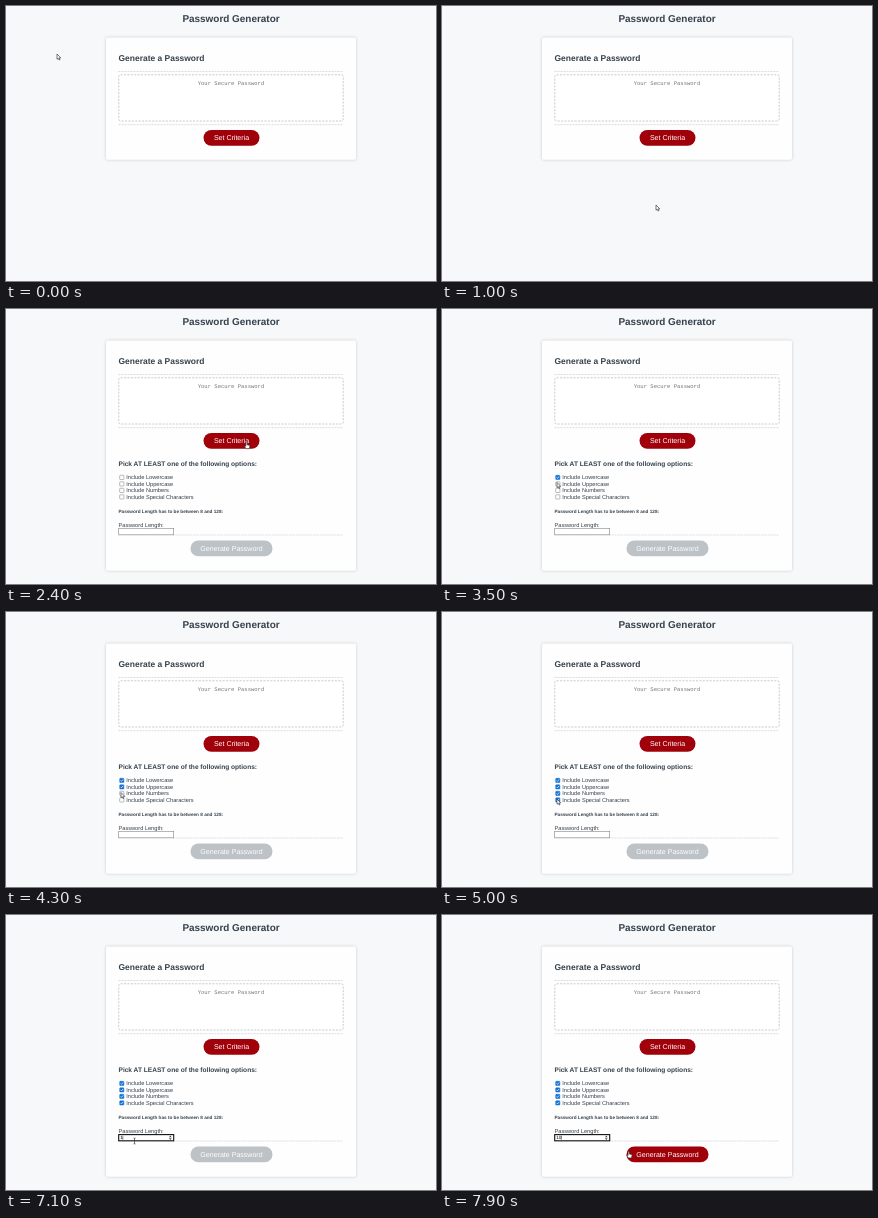
An HTML page that plays this animation: 430 px wide and 275 px high, repeating every 8 s.

```html
<!DOCTYPE html>
<html lang="en">
<head>
<meta charset="utf-8">
<title>Password Generator</title>
<style>
  html, body { margin: 0; width: 100%; height: 100%; overflow: hidden; background: #f6f8fa; }
  svg { display: block; width: 430px; height: 275px; }
  text { font-family: "Liberation Sans", Arial, sans-serif; font-size: 5.65px; fill: #35414c; text-rendering: geometricPrecision; }
  .bold { font-weight: bold; }
  .mid { text-anchor: middle; }
  .mono { font-family: "Liberation Mono", "Courier New", monospace; font-size: 5.55px; fill: #757575; }
  .btn { font-size: 7.06px; fill: #fff; }
  .rule { stroke: #cfd4d8; stroke-width: .8; stroke-dasharray: 2 1; }
  .card { filter: drop-shadow(0 .7px 1.4px rgba(0, 0, 0, .19)); }
  .pointer { fill: #fff; stroke: #333; stroke-width: .65; stroke-linejoin: round; }
</style>
</head>
<body>
<svg viewBox="0 0 430 275">
  <rect width="430" height="275" fill="#f6f8fa"/>
  <text class="bold mid" x="225" y="16" font-size="10" style="font-size:9.95px">Password Generator</text>
  <rect id="card" class="card" x="100" y="31.5" width="250" height="122.3" rx="1.8" fill="#fefefe"/>

  <text class="bold" x="112.5" y="55.3" style="font-size:8.46px">Generate a Password</text>
  <path class="rule" d="M112.5 65.5H337.5M112.5 118.7H337.5"/>
  <rect x="112.8" y="68.8" width="224.4" height="46.2" rx="1.8" fill="#fff" stroke="#c1c7cb" stroke-width=".9" stroke-dasharray="2.1 1.3"/>
  <text class="mono mid" x="225" y="79.4">Your Secure Password</text>
  <rect x="197.5" y="124" width="56" height="15.7" rx="7.85" fill="#a0000a"/>
  <text class="btn mid" x="225.5" y="134.3">Set Criteria</text>

  <g id="criteria">
    <text class="bold" x="112.5" y="157.3" style="font-size:6.58px">Pick AT LEAST one of the following options:</text>
    <g id="options"></g>
    <text class="bold" x="112.5" y="203.7" style="font-size:4.67px">Password Length has to be between 8 and 128:</text>
    <text x="112.5" y="217.5">Password Length:</text>
    <path class="rule" d="M112.5 226H337.5"/>
    <rect id="field" x="112.7" y="219.6" width="55" height="6.2" fill="#fff"/>
    <text id="digits" x="114.2" y="224.4" style="font-size:4.7px;fill:#111"></text>
    <path id="caret" d="M0 220.7V224.8" stroke="#111" stroke-width=".5"/>
    <path id="spinner" d="M163 222.2l1.3-1.6 1.3 1.6zM163 223.3l1.3 1.6 1.3-1.6z" fill="#444"/>
    <rect id="submit" x="184.5" y="231.5" width="82" height="15.8" rx="7.9"/>
    <text class="btn mid" x="225.5" y="241.9">Generate Password</text>
  </g>

  <g id="cursor">
    <path id="arrow" class="pointer" d="M0 0V5.2L1.2 4.2 2.1 6 3 5.6 2.2 3.9H3.8Z"/>
    <path id="hand" class="pointer" d="M-.6 .4Q0 -.3 .6 .4V2.5L2.7 3Q3.4 3.2 3.3 4L2.8 6.4H-.4L-2 4.1Q-1.7 3.3 -.6 4Z"/>
    <path id="beam" d="M-1 -3Q0 -3 0 -2.4Q0 -3 1 -3M0 -2.4V2.4M-1 3Q0 3 0 2.4Q0 3 1 3" fill="none" stroke="#222" stroke-width=".6"/>
  </g>
</svg>
<script>
const LOOP = 8000, STEP = 100;
const $ = id => document.getElementById(id);
const show = (id, on) => $(id).setAttribute("display", on ? "inline" : "none");
const set = (id, attrs) => { for (const k in attrs) $(id).setAttribute(k, attrs[k]); };

const OPEN = 2400, FOCUS = 5500, FIRST = 7100, SECOND = 7600;
const options = [
  ["Lowercase", 3300], ["Uppercase", 3900], ["Numbers", 4400], ["Special Characters", 4900]
];

$("options").innerHTML = options.map(([label], i) => {
  const y = 168.4 + i * 6.5;
  return `<rect id="box${i}" x="113.7" y="${y - 2.1}" width="4.2" height="4.2" rx=".6" stroke-width=".5"/>
    <path id="tick${i}" d="M114.6 ${y}l.9 1 1.6-2" fill="none" stroke="#fff" stroke-width=".7"/>
    <text x="120.2" y="${y + 2}">Include ${label}</text>`;
}).join("");

// Pointer stops: time, x, y
const path = [
  [0, 51, 48], [1000, 214, 199], [1600, 240.5, 133.3], [2400, 240.5, 133.3],
  [3200, 115, 167.5], [3300, 115, 167.5], [3500, 115, 173.5], [4000, 115, 174],
  [4300, 115, 180.5], [4500, 115, 180.5], [4800, 115, 187], [5000, 115, 187],
  [5500, 127.5, 223.5], [5600, 127.5, 223.5], [5700, 128.5, 226],
  [7600, 128.5, 226], [7900, 186.7, 236.5], [8000, 186.7, 236.5]
];

function pointerAt(t) {
  const i = Math.max(1, path.findIndex(p => p[0] > t));
  const [t0, x0, y0] = path[i - 1], [t1, x1, y1] = path[i];
  const u = (t - t0) / (t1 - t0), e = u * u * (3 - 2 * u);
  return [x0 + (x1 - x0) * e, y0 + (y1 - y0) * e];
}

const inside = (x, y, l, t, r, b) => x >= l && x <= r && y >= t && y <= b;

function render(t) {
  const open = t >= OPEN, focused = t >= FOCUS, ready = t >= SECOND;
  show("criteria", open);
  set("card", { height: open ? 230.2 : 122.3 });

  options.forEach(([, at], i) => {
    const on = t >= at;
    set("box" + i, { fill: on ? "#1470d2" : "#fff", stroke: on ? "#1470d2" : "#767676" });
    show("tick" + i, on);
  });

  set("field", { stroke: focused ? "#111" : "#858585", "stroke-width": focused ? 1.1 : .6 });
  const value = ready ? "10" : t >= FIRST ? "1" : "";
  $("digits").textContent = value;
  const caretX = 114.2 + value.length * 2.62;
  set("caret", { transform: `translate(${caretX} 0)` });
  show("caret", focused && !(t >= 6100 && t < 6600));

  set("submit", { fill: ready ? "#a0000a" : "#bdc2c7" });

  const [x, y] = pointerAt(t);
  const overField = open && inside(x, y, 112, 219, 168, 226.5);
  const overButton = inside(x, y, 197.5, 124, 253.5, 140) || (ready && inside(x, y, 184.5, 231.5, 266.5, 247.5));
  show("spinner", focused || overField);
  set("cursor", { transform: `translate(${x} ${y})` });
  show("beam", overField);
  show("hand", overButton);
  show("arrow", !overField && !overButton);
}

function tick(now) {
  render(Math.floor((now % LOOP) / STEP) * STEP);
  requestAnimationFrame(tick);
}
render(0);
requestAnimationFrame(tick);
</script>
</body>
</html>
```
